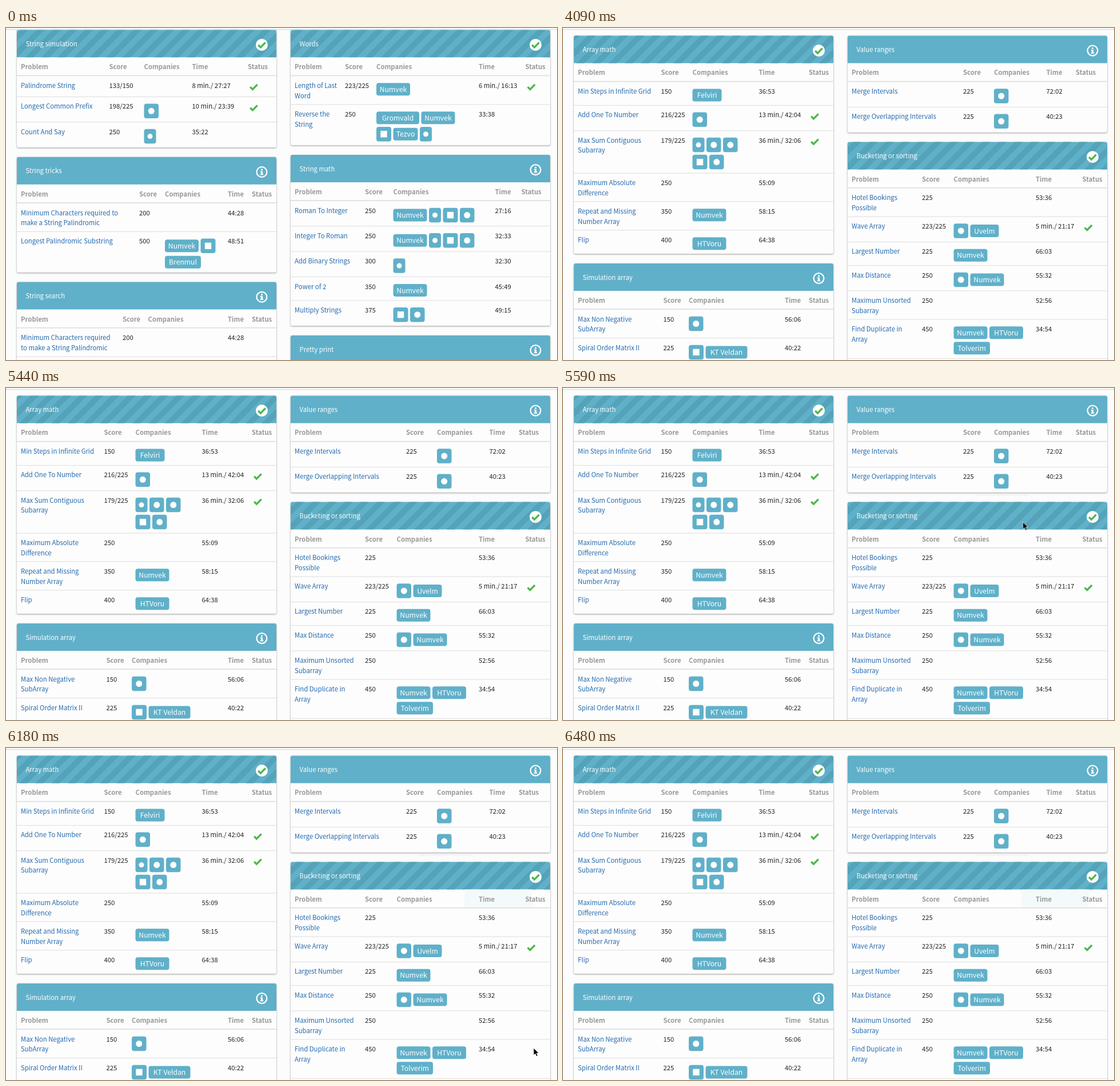
An HTML page for the animation above (7160 ms loop, 964x581 px).

```html
<!DOCTYPE html>
<html lang="en">
<head>
<meta charset="utf-8">
<title>Problem lists</title>
<style>
html, body { margin: 0; width: 100%; height: 100%; overflow: hidden; background: #fcfcfc; }
svg { display: block; width: 964px; height: 581px; }
text { font: 11.3px "Noto Sans CJK JP", "Noto Sans CJK SC", "Noto Sans CJK", Lato, sans-serif; fill: #222; white-space: pre; }
.title { fill: #fff; }
.head { font-weight: 700; fill: #999; }
.link { fill: #2469ad; }
.word { font-size: 12.2px; font-weight: 500; fill: #fff; text-anchor: middle; }
.card { fill: #fdfdfd; filter: drop-shadow(0 1px 1.5px rgba(0,0,0,.38)); }
.teal { fill: #60b0c9; }
.line { fill: #ddd; }
.check { fill: none; stroke: #4db749; stroke-width: 3.3; }
.ring { fill: none; stroke: #fff; stroke-width: 2.3; }
.white { fill: #fff; }
.first, .second, .trail, .tint, .pointer { animation: 7160ms step-end infinite; }
.first { animation-name: first; }
.second { animation-name: second; }
.trail { animation-name: trail; fill: #f5f5f5; }
.tint { animation-name: tint; fill: #f4f9fc; }
.pointer { animation-name: pointer; }
@keyframes first { 0% { visibility: visible } 57.123%, 100% { visibility: hidden } }
@keyframes second { 0% { visibility: hidden } 57.123%, 100% { visibility: visible } }
@keyframes trail { 0% { visibility: hidden } 78.073%, 100% { visibility: visible } }
@keyframes tint { 0% { visibility: hidden } 82.123%, 100% { visibility: visible } }
@keyframes pointer {
  0% { visibility: hidden; transform: translate(804.5px, 234.5px) }
  78.073% { visibility: visible; transform: translate(804.5px, 234.5px) }
  82.123% { visibility: visible; transform: translate(909.5px, 443px) }
  84.218% { visibility: visible; transform: translate(918.5px, 476px) }
  86.313% { visibility: visible; transform: translate(923px, 525px) }
  88.408% { visibility: visible; transform: translate(937.5px, 575px) }
  90.503%, 100% { visibility: hidden; transform: translate(937.5px, 575px) }
}
</style>
</head>
<body>
<svg viewBox="0 0 964 581">
  <defs>
    <pattern id="stripes" width="20" height="20" patternUnits="userSpaceOnUse" patternTransform="rotate(45)">
      <rect width="10" height="20" fill="#54a3b8"/>
    </pattern>
  </defs>
  <g class="first" id="strings"></g>
  <g class="second" id="arrays"></g>
  <rect class="trail" x="721" y="186" width="94" height="3"/>
  <rect class="line" y="2" width="964" height="1.3"/>
  <path class="pointer" d="M0 0V12.6L2.9 10L5 14.6L7.3 13.6L5.3 9.1H9.2Z" fill="#000" stroke="#fff" stroke-width=".8"/>
</svg>
<script>
const LINE = 17.8, GAP = 16.8, HEAD = 80.7, WIDTH = 454;
const wordWidths = {
  Numvek: 59, Gromvald: 75, Tezvo: 43, Brenmul: 63, Felviri: 51,
  HTVoru: 59, Uvelm: 50, 'KT Veldan': 73, Tolverim: 63.5
};
// Icon tags: round, slim round, square
const iconWidths = { o: 25.5, s: 21, q: 26 };

const rect = (cls, x, y, w, h, r = 0) =>
  `<rect class="${cls}" x="${x}" y="${y}" width="${w}" height="${h}" rx="${r}"/>`;
const text = (cls, x, y, s) => s ? `<text class="${cls}" x="${x}" y="${y}">${s}</text>` : '';
const check = (x, y) => `<path class="check" d="M${x - 6.3} ${y + .3}l4.2 4.2l8.4 -8.6"/>`;

function badge(x, y, done) {
  if (done) return `<circle class="white" cx="${x}" cy="${y}" r="10.5"/>` + check(x, y);
  return `<circle class="ring" cx="${x}" cy="${y}" r="8.9"/>` +
    `<path class="white" d="M${x - 1.5} ${y - 5.4}h3v2.6h-3zM${x - 2.6} ${y - 1.6}h4.2v5h1.2v1.8h-5.6v-1.8h1.2v-3.2h-1z"/>`;
}

function tag(x, y, name) {
  const icon = iconWidths[name], w = icon || wordWidths[name], h = icon ? 25.5 : 22;
  const box = rect('teal', x, y - h / 2, w, h, 4), mid = x + w / 2;
  if (!icon) return [w, box + text('word', mid, y + 4.6, name)];
  if (name === 'q') return [w, box + rect('white', mid - 5.7, y - 5.7, 11.4, 11.4)];
  return [w, box + `<circle class="white" cx="${mid}" cy="${y}" r="${name === 's' ? 4.5 : 5.5}"/>`];
}

function row(y, spec, x, cols) {
  const [name, score = '', tags = '', time = '', done] = spec.split(';');
  const lines = name.split('|');
  let out = '', tagHeight = 0;
  lines.forEach((s, i) => out += text('link', x + 7, y + 21 + i * 17.7, s));
  out += text('', cols[0], y + 21, score) + text('', cols[2], y + 21, time);
  if (tags) for (const group of tags.split('/')) {
    const names = group.split(','), h = names.some(n => iconWidths[n]) ? 30 : 27;
    let tx = cols[1];
    for (const n of names) {
      const [w, svg] = tag(tx, y + 9.9 + tagHeight + h / 2, n);
      out += svg;
      tx += w + 3.5;
    }
    tagHeight += h;
  }
  if (done) out += check(cols[3] + 10.5, y + 19);
  return [Math.max(lines.length * LINE, tagHeight, done ? 22.2 : 0) + 14.3, out];
}

function card(x, y, { title, striped, done, cols, rows }) {
  let bottom = y + HEAD, out = '';
  rows.forEach((spec, i) => {
    if (i) out += rect('line', x, bottom - .5, WIDTH, 1);
    const [h, svg] = row(bottom, spec, x, cols);
    out += svg;
    bottom += h;
  });
  const header = `M${x} ${y + 48}v-45a3 3 0 0 1 3 -3h${WIDTH - 6}a3 3 0 0 1 3 3v45z`;
  let top = rect('card', x, y, WIDTH, bottom - y, 3) + `<path class="teal" d="${header}"/>`;
  if (striped) top += `<path fill="url(#stripes)" d="${header}"/>`;
  top += text('title', x + 15.5, y + 28.6, title) + badge(x + 428.5, y + 26.2, done);
  if (title === 'Bucketing or sorting') top += rect('tint', 802, y + 48, 118, 32);
  ['Problem', 'Score', 'Companies', 'Time', 'Status'].forEach((s, i) =>
    top += text('head', i ? cols[i - 1] : x + 7, y + 69, s));
  return [bottom + GAP, top + rect('line', x, y + HEAD - 1.3, WIDTH, 1.6) + out];
}

function page(id, y, columns) {
  let out = '';
  columns.forEach((cards, i) => {
    let top = y;
    for (const c of cards) {
      const [next, svg] = card(i ? 498 : 19, top, c);
      out += svg;
      top = next;
    }
  });
  document.getElementById(id).innerHTML = out;
}

page('strings', 3.2, [[
  { title: 'String simulation', striped: 1, done: 1, cols: [180.5, 241.5, 325.5, 423], rows: [
    'Palindrome String;133/150;;8 min./ 27:27;1',
    'Longest Common Prefix;198/225;o;10 min./ 23:39;1',
    'Count And Say;250;s;35:22'] },
  { title: 'String tricks', cols: [233, 278, 388, 430], rows: [
    'Minimum Characters required to|make a String Palindromic;200;;44:28',
    'Longest Palindromic Substring;500;Numvek,q/Brenmul;48:51'] },
  { title: 'String search', cols: [204, 248.5, 388, 430], rows: [
    'Minimum Characters required|to make a String Palindromic;200;;44:28', ''] }
], [
  { title: 'Words', striped: 1, done: 1, cols: [593, 648, 827, 908.5], rows: [
    'Length of Last|Word;223/225;Numvek;6 min./ 16:13;1',
    'Reverse the|String;250;Gromvald,Numvek/q,Tezvo,s;33:38'] },
  { title: 'String math', cols: [628, 677.5, 855.5, 901.5], rows: [
    'Roman To Integer;250;Numvek,s,q,q;27:16'.replace('q,q', 'q,o'),
    'Integer To Roman;250;Numvek,s,q,o;32:33',
    'Add Binary Strings;300;s;32:30',
    'Power of 2;350;Numvek;45:49',
    'Multiply Strings;375;q,o;49:15'] },
  { title: 'Pretty print', cols: [628, 677.5, 855.5, 901.5], rows: [] }
]]);

page('arrays', 13.4, [[
  { title: 'Array math', striped: 1, done: 1, cols: [171.5, 226.5, 342.5, 430], rows: [
    'Min Steps in Infinite Grid;150;Felviri;36:53',
    'Add One To Number;216/225;o;13 min./ 42:04;1',
    'Max Sum Contiguous|Subarray;179/225;s,o,o/q,o;36 min./ 32:06;1',
    'Maximum Absolute|Difference;250;;55:09',
    'Repeat and Missing|Number Array;350;Numvek;58:15',
    'Flip;400;HTVoru;64:38'] },
  { title: 'Simulation array', cols: [175.5, 220, 388, 430], rows: [
    'Max Non Negative|SubArray;150;o;56:06',
    'Spiral Order Matrix II;225;q,KT Veldan;40:22'] }
], [
  { title: 'Value ranges', cols: [700, 754, 845.5, 897], rows: [
    'Merge Intervals;225;o;72:02',
    'Merge Overlapping Intervals;225;o;40:23'] },
  { title: 'Bucketing or sorting', striped: 1, done: 1, cols: [628, 683.5, 827, 908.5], rows: [
    'Hotel Bookings|Possible;225;;53:36',
    'Wave Array;223/225;o,Uvelm;5 min./ 21:17;1',
    'Largest Number;225;Numvek;66:03',
    'Max Distance;250;o,Numvek;55:32',
    'Maximum Unsorted|Subarray;250;;52:56',
    'Find Duplicate in|Array;450;Numvek,HTVoru/Tolverim;34:54', ''] }
]]);
</script>
</body>
</html>
```
